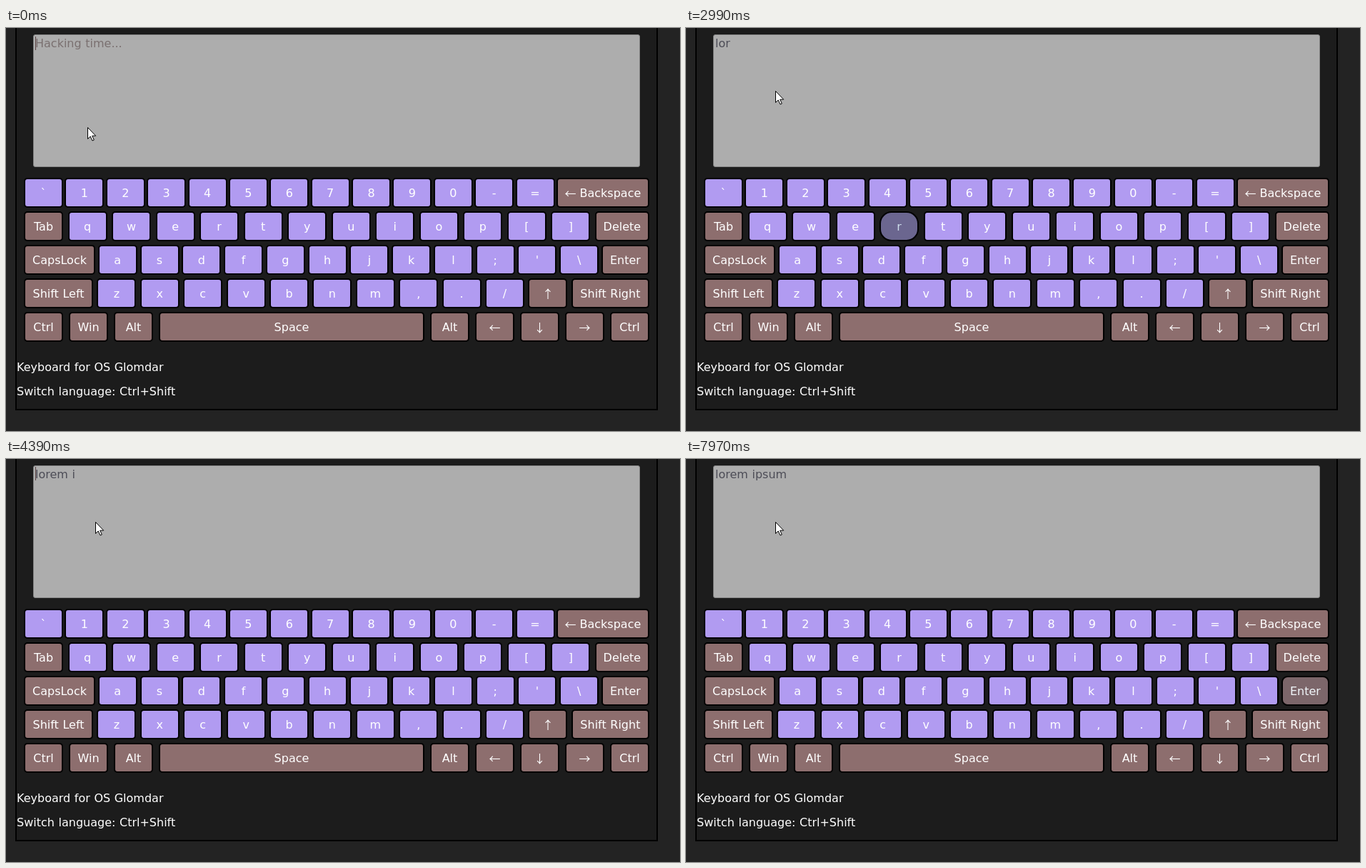
An HTML page that plays this animation: 944x565 px, repeating every 8 s.

```html
<!DOCTYPE html>
<html lang="en">
<head>
<meta charset="utf-8">
<title>On-screen keyboard</title>
<style>
  html, body { margin: 0; width: 100%; height: 100%; overflow: hidden; background: #232323; }
  body { position: relative; font: 16px/19px "DejaVu Sans", sans-serif; word-spacing: .5px; white-space: pre; color: #fff; }
  body > * { position: absolute; box-sizing: border-box; margin: 0; }
  #panel { left: 13px; top: -10px; width: 900px; height: 546px; border: 2px solid #000; background: #1c1c1c; }
  #area { left: 38px; top: 9px; width: 850px; height: 186px; border: 1px solid #858585; border-radius: 3px; background: #adadad; }
  #text { left: 41px; top: 12px; }
  #caret { left: 41px; width: 1px; height: 19px; background: #5c4444; }
  .row { left: 25px; width: 876px; height: 42px; display: flex; justify-content: space-between; }
  .key { box-sizing: border-box; flex: none; border: 2px solid #000; display: flex; align-items: center; justify-content: center; }
  .arrow { font-family: "Noto Sans CJK JP", "Noto Sans CJK", "DejaVu Sans", sans-serif; }
  .note { left: 15px; }
  #click { left: 113px; top: 76px; width: 24px; height: 24px; border-radius: 50%; background: rgba(255, 255, 0, .47); }
  #mouse { left: 0; top: 0; overflow: visible; }
</style>
</head>
<body>
<div id="panel"></div>
<div id="area"></div>
<div id="text"></div>
<div id="caret"></div>
<p class="note" style="top:466px">Keyboard for OS Glomdar</p>
<p class="note" style="top:500px">Switch language: Ctrl+Shift</p>
<div id="click"></div>
<svg id="mouse" width="14" height="21"><path d="M.5 .5V16.5L4.2 13L7 19L9.3 18L6.7 12.2H11.7Z" fill="#fff" stroke="#000"/></svg>
<script>
const LOOP = 8000;
const $ = id => document.getElementById(id);

const rows = [
  "` 1 2 3 4 5 6 7 8 9 0 - = ←_Backspace",
  "Tab q w e r t y u i o p [ ] Delete",
  "CapsLock a s d f g h j k l ; ' \\ Enter",
  "Shift_Left z x c v b n m , . / ↑ Shift_Right",
  "Ctrl Win Alt Space Alt ← ↓ → Ctrl"
];
const widths = {
  "← Backspace": 130, Delete: 76, CapsLock: 100, Enter: 67,
  "Shift Left": 97, "Shift Right": 109, Space: 372
};
const PURPLE = [177, 155, 241], BROWN = [141, 110, 110];
const PURPLE_DOWN = [107, 102, 143], BROWN_DOWN = [84, 82, 96];
const WHITE = [255, 255, 255], WHITE_DOWN = [205, 222, 234];

// key, start, end, strength; without an end the key stays down
const presses = [
  ["l", 1970, 2120], ["o", 2200, 2350], ["r", 2990, 3150], ["e", 3120, 3220],
  ["m", 3460, 3610], ["Space", 3760, 3840], ["i", 4200, 4390], ["p", 5020, 5080],
  ["s", 5640, 5780], ["u", 6090, 6180], ["m", 6640, 6790], ["Enter", 7960, Infinity, .3]
];
const caretOn = [
  [0, 500], [1010, 1570], [2110, 2680], [3130, 3600], [4160, 4700],
  [5250, 5780], [6320, 6790], [7340, 7900]
];

const keys = [];
rows.forEach((line, i) => {
  const row = document.createElement("div");
  row.className = "row";
  row.style.top = 210 + 47 * i + "px";
  for (const word of line.split(" ")) {
    const label = word.replace("_", " ");
    const el = document.createElement("div");
    el.className = "key";
    el.style.width = (widths[label] || 55) + "px";
    el.innerHTML = label.replace(/[←↑→↓]/, '<span class="arrow">$&</span>');
    row.append(el);
    keys.push({ el, label, plain: label.length === 1 && !/[←↑→↓]/.test(label) });
  }
  document.body.insertBefore(row, $("click"));
});

const mix = (a, b, k) => `rgb(${a.map((v, i) => Math.round(v + (b[i] - v) * k))})`;

function level(label, t) {
  for (const [key, from, to, peak = 1] of presses)
    if (key === label && t >= from && t < to) return peak * (1 - ((t - from) / (to - from)) ** 2);
  return 0;
}

function draw(t) {
  for (const { el, label, plain } of keys) {
    const k = level(label, t);
    el.style.background = plain ? mix(PURPLE, PURPLE_DOWN, k) : mix(BROWN, BROWN_DOWN, k);
    el.style.color = mix(WHITE, WHITE_DOWN, k);
    el.style.borderRadius = 5 + 12 * k + "px";
  }

  const typed = presses.filter(p => t >= p[1] && p[0] !== "Enter")
    .map(p => p[0] === "Space" ? " " : p[0]).join("");
  $("text").textContent = typed || "Hacking time...";
  $("text").style.color = typed ? "#4d4d57" : "#7a7070";
  $("caret").style.top = typed ? "11px" : "12px";
  $("caret").hidden = !caretOn.some(([a, b]) => t >= a && t < b);

  const p = Math.min(1, Math.max(0, (t - 40) / 500));
  const s = p * p * (3 - 2 * p);
  $("mouse").style.transform = `translate(${Math.round(114 + 11 * s)}px, ${Math.round(139 - 51 * s)}px)`;
  $("click").hidden = t < 870 || t >= 1010;
}

const start = performance.now();
function tick() {
  draw((performance.now() - start) % LOOP);
  requestAnimationFrame(tick);
}
tick();
</script>
</body>
</html>
```
